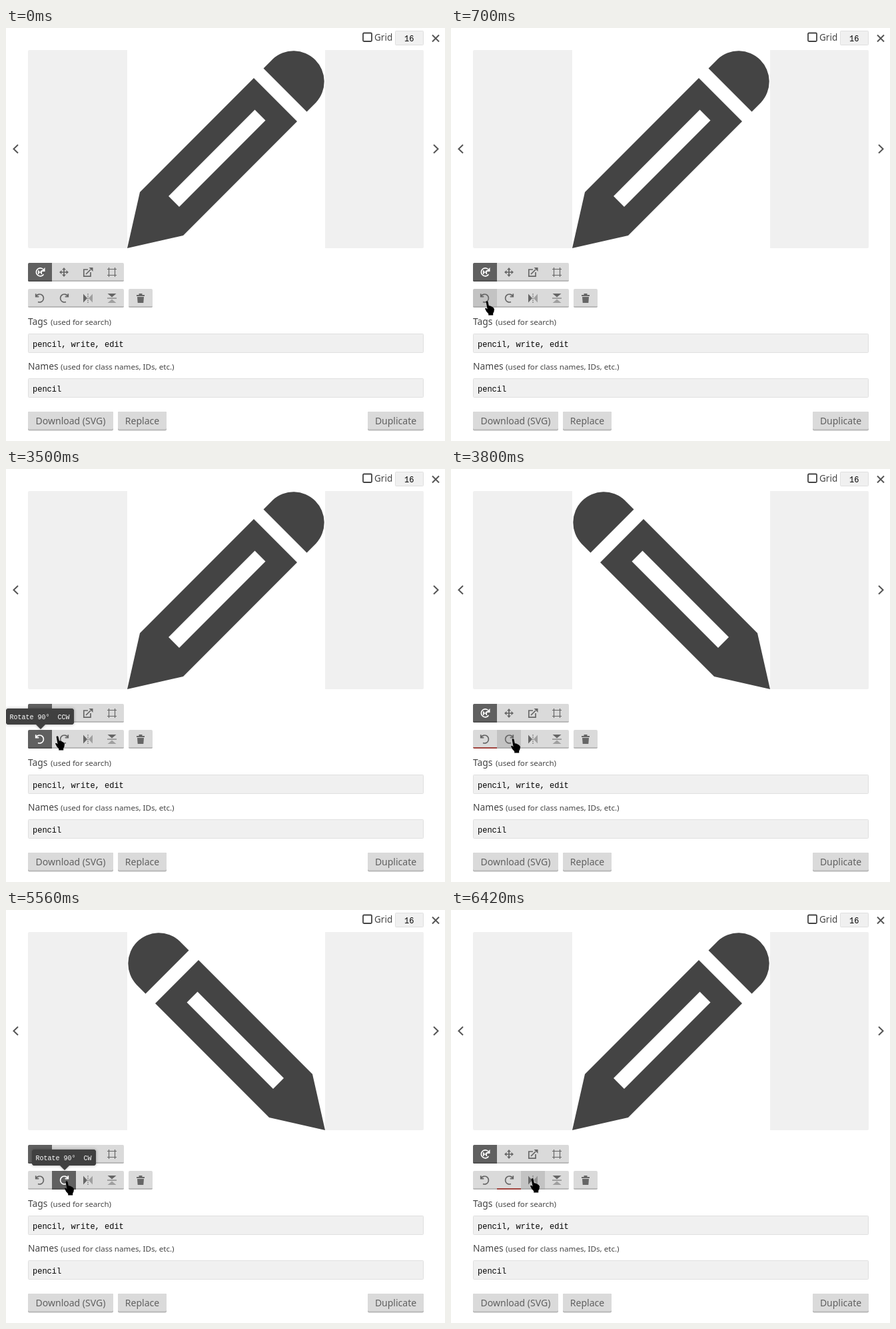
These frames come from a looping animation (659x619 px, 8 s). An HTML page:

```html
<!DOCTYPE html>
<html lang="en">
<head>
<meta charset="utf-8">
<title>Icon editor</title>
<style>
  html, body { margin: 0; width: 100%; height: 100%; overflow: hidden; background: #fff; }
  svg { display: block; }
  text { font: 14px "Noto Sans", "Open Sans", sans-serif; fill: #444; white-space: pre; }
  .label { font-size: 13.8px; }
  .small { font-size: 11.6px; }
  .mono { font: 12px "Liberation Mono", monospace; fill: #000; }
  .button text { fill: #606060; text-anchor: middle; }
  .field { fill: #f0f0f0; stroke: #e0e0e0; }
  .line { fill: none; stroke: currentColor; stroke-width: 1.7; }
  .tool { color: #666; --face: #dadada; --edge: #b8b8b8; }
  .tool.hover { --face: #c3c3c3; --edge: #adadad; }
  .tool.active { color: #fff; --face: #606060; --edge: #505050; }
  .tool.focus { --edge: #a0443f; }
  .face { fill: var(--face); }
  .edge { fill: var(--edge); }
  #tip text { font-size: 10px; fill: #fff; }
  #tipBox { filter: drop-shadow(0 0 2px #0005); fill: #404040; }
</style>
</head>
<body>
<svg width="659" height="619" viewBox="0 0 659 619">
  <defs>
    <clipPath id="rows">
      <rect x="33" y="352" width="144" height="28" rx="2"/>
      <rect x="33" y="391" width="144" height="28" rx="2"/>
      <rect x="184" y="391" width="36" height="28" rx="2"/>
    </clipPath>
    <!-- icons are centred on 0,0 -->
    <g id="spin">
      <path class="line" stroke-width="2" d="M4.5-4.5A6 6 0 1 0 5.4 3.2"/>
      <path fill="currentColor" d="M7.5-7V-1H1.5Z"/>
      <path class="line" d="M-2.2-2.8V3M2.2-2.8V3M-2 0H2"/>
    </g>
    <g id="move">
      <path class="line" d="M-5 0H5M0-5V5"/>
      <path fill="currentColor" d="M-7 0l3.5-3v6zM7 0l-3.5-3v6zM0-7l-3 3.5h6zM0 7l-3-3.5h6z"/>
    </g>
    <g id="scale">
      <path class="line" d="M0-4H-6.2V6.2H4V0M-3 3L4-4"/>
      <path fill="currentColor" d="M1.5-7H7.5V-1Z"/>
    </g>
    <g id="crop">
      <path class="line" style="stroke-width:1.2" d="M-4.5-7V7M4.5-7V7M-7-4.5H7M-7 4.5H7"/>
    </g>
    <g id="undo">
      <path class="line" d="M-6.3-6.8V-2.3H-1.7M-6-2.6A6 6 0 1 1-3 5.5"/>
    </g>
    <g id="redo"><use href="#undo" transform="scale(-1 1)"/></g>
    <g id="flipH">
      <path fill="currentColor" d="M-7-6.5L-1 0L-7 6.5Z"/>
      <path fill="currentColor" opacity=".5" d="M7-6.5L1 0L7 6.5Z"/>
      <path stroke="currentColor" stroke-dasharray="2 1" d="M0-7V7"/>
    </g>
    <g id="flipV">
      <path fill="currentColor" d="M-6.5-7L0-1.5L6.5-7Z"/>
      <path fill="currentColor" opacity=".5" d="M-6.5 7L0 1.5L6.5 7Z"/>
      <path stroke="currentColor" d="M-7 0H7"/>
    </g>
    <g id="trash" fill="currentColor">
      <path d="M-6-5H-2.5V-7H2.5V-5H6V-3H-6ZM-5-2H5L4.3 7H-4.3Z"/>
    </g>
  </defs>

  <rect width="659" height="619" fill="#fff"/>
  <rect x="536" y="7.5" width="13" height="12.5" rx="1.5" fill="none" stroke="#444" stroke-width="1.8"/>
  <text x="553" y="19" style="font-size:13.5px">Grid</text>
  <rect class="field" x="584.5" y="4.5" width="42" height="21" rx="1"/>
  <text class="mono" x="598" y="20">16</text>
  <g fill="none" stroke="#555" stroke-width="2">
    <path d="M640 10.5L650 20.5M650 10.5L640 20.5"/>
    <path d="M18 175L11.5 181.2L18 187.5M642 175L648.5 181.2L642 187.5"/>
  </g>

  <rect x="33" y="33" width="594" height="297" rx="2" fill="#f0f0f0"/>
  <rect x="182" y="33" width="297" height="297" fill="#fff"/>
  <path id="pencil" fill="#444" fill-rule="evenodd" d="M372 75L437 140L266 311L182 330L201 246Z
    M373.5 122.5L389.5 138.5L260 268L244 252Z
    M386.5 60.5L400.5 46.5A46 46 0 0 1 465.5 111.5L451.5 125.5Z"/>

  <g id="tools" clip-path="url(#rows)"></g>

  <text class="label" x="33" y="445">Tags</text>
  <text class="small" x="67" y="445">(used for search)</text>
  <rect class="field" x="33.5" y="458.5" width="593" height="28" rx="1"/>
  <text class="mono" x="40" y="478">pencil, write, edit</text>
  <text class="label" x="33" y="512">Names</text>
  <text class="small" x="82" y="512">(used for class names, IDs, etc.)</text>
  <rect class="field" x="33.5" y="525.5" width="593" height="28" rx="1"/>
  <text class="mono" x="40" y="545">pencil</text>
  <g id="buttons"></g>

  <g id="tip">
    <path id="tipBox"/>
    <text class="mono" y="375"></text>
  </g>
  <path id="hand" d="M1.6 1.2Q2.8-.6 4.4 1L5.8 7.2L8 7.5L10.5 8.8L12.5 10L14 12.2L13.4 16.5L12.2 18.5V21.5H5.2V19.2L2.2 16L0 11.6Q.8 10 2.4 11.2L3.6 12.6Z"/>
</svg>
<script>
const $ = id => document.getElementById(id);

const icons = ['spin', 'move', 'scale', 'crop', 'undo', 'redo', 'flipH', 'flipV', 'trash'];
$('tools').innerHTML = icons.map((icon, i) => {
  const x = icon === 'trash' ? 184 : 33 + i % 4 * 36, y = i < 4 ? 352 : 391;
  return `<g class="tool" transform="translate(${x} ${y})">
    <rect class="face" width="36" height="28"/><rect class="edge" y="26" width="36" height="2"/>
    <use href="#${icon}" x="18" y="14"/></g>`;
}).join('');
const tools = [...$('tools').children];

$('buttons').innerHTML = [[33, 128, 'Download (SVG)'], [168, 73, 'Replace'], [543, 84, 'Duplicate']]
  .map(([x, w, label]) => `<g class="button">
    <rect x="${x}" y="575" width="${w}" height="28.5" rx="2" fill="#b8b8b8"/>
    <rect x="${x}" y="575" width="${w}" height="26.5" rx="2" fill="#dadada"/>
    <text x="${x + w / 2}" y="594">${label}</text></g>`).join('');

const tips = {
  undo: { left: 0, right: 102, tipX: 52, textX: 5.5, text: 'Rotate 90°  CCW' },
  redo: { left: 39, right: 135, tipX: 88, textX: 44.5, text: 'Rotate 90°  CW' }
};

// Each entry changes only the listed properties; at is the hand's position.
const steps = [
  { t: 0, at: null, hover: '', active: '', focus: '', tip: '', turned: false },
  { t: 70, at: [194, 449] },
  { t: 145, at: [172, 427] },
  { t: 220, at: [148, 396], hover: 'flipV' },
  { t: 295, at: [106, 366], hover: 'scale' },
  { t: 370, at: [84, 360], hover: 'move' },
  { t: 445, at: [62, 384], hover: '' },
  { t: 520, at: [50, 408], hover: 'undo' },
  { t: 700, at: [51, 409] },
  { t: 1850, tip: 'undo' },
  { t: 3500, at: [74, 400], hover: '', active: 'undo' },
  { t: 3570, at: [90, 404], hover: 'redo', active: '', focus: 'undo' },
  { t: 3800, tip: '', turned: true },
  { t: 3900, at: [88, 406] },
  { t: 5560, active: 'redo', focus: '', tip: 'redo' },
  { t: 6040, at: [101, 402], active: '', focus: 'redo', tip: '', turned: false },
  { t: 6240, at: [108, 401], hover: 'flipH' },
  { t: 6330, at: [114, 401] },
  { t: 6420, at: [119, 402] }
];

function draw(time) {
  const s = Object.assign({}, ...steps.filter(step => step.t <= time));

  tools.forEach((tool, i) => {
    const name = icons[i];
    tool.classList.toggle('hover', name === s.hover);
    tool.classList.toggle('active', name === 'spin' || name === s.active);
    tool.classList.toggle('focus', name === s.focus);
  });

  $('pencil').setAttribute('transform', s.turned ? 'rotate(-90 330.5 181.5)' : '');

  $('hand').style.display = s.at ? '' : 'none';
  if (s.at) $('hand').setAttribute('transform', `translate(${s.at})`);

  const tip = tips[s.tip];
  $('tip').style.display = tip ? '' : 'none';
  if (tip) {
    const { left, right, tipX, textX, text } = tip, label = $('tip').querySelector('text');
    $('tipBox').setAttribute('d', `M${left + 2} 359H${right - 2}l2 2V381l-2 2H${tipX + 7}l-7 7l-7-7H${left + 2}l-2-2V361Z`);
    label.setAttribute('x', textX);
    label.textContent = text;
  }
}

const start = performance.now();
function loop() {
  draw((performance.now() - start) % 8000);
  requestAnimationFrame(loop);
}
loop();
</script>
</body>
</html>
```
